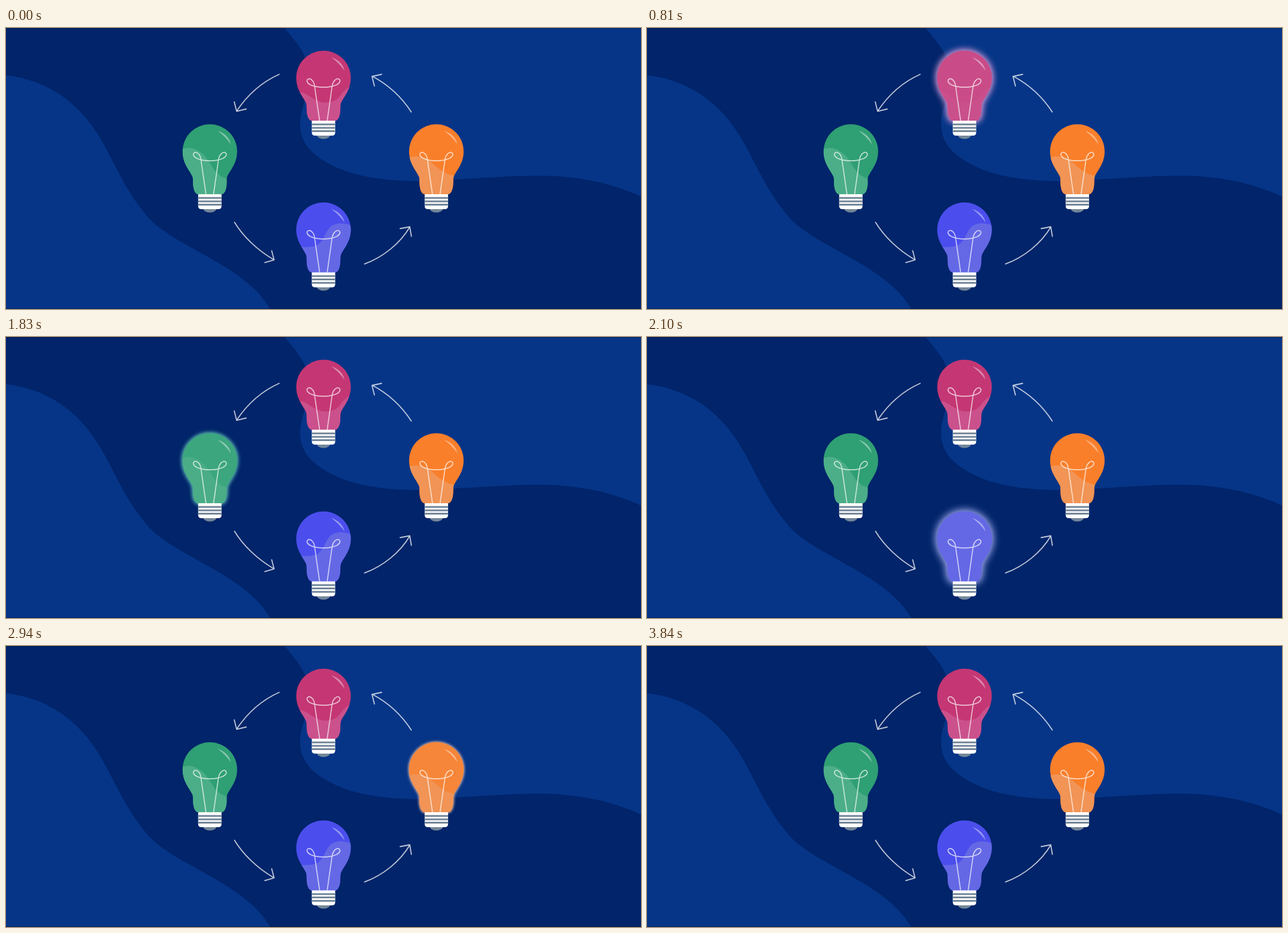
These frames come from a looping animation (1060 px wide and 470 px high, 3870 ms). An HTML page:

```html
<!DOCTYPE html>
<html lang="en">
<head>
<meta charset="utf-8">
<title>Light bulb cycle</title>
<style>
html, body { margin: 0; width: 100%; height: 100%; overflow: hidden; background: #01246a; }
svg { display: block; width: 100%; height: 100%; }
.arrow { fill: none; stroke: #fff; stroke-opacity: .74; stroke-width: 1.8; stroke-linecap: round; stroke-linejoin: round; }
.wire { fill: none; stroke: #fff; stroke-opacity: .68; stroke-width: 1.7; stroke-linejoin: round; }
.shine { fill: #fff; fill-opacity: .42; }
</style>
</head>
<body>
<svg viewBox="0 0 1060 470">
  <defs>
    <path id="glass" d="M0-45.5A45.5 45.5 0 0 1 45.5 0C45.5 20 34 31 29 42C27.7 46 28.4 50 28 55C27.5 63 25 72 18 72H-18C-25 72-27.5 63-28 55C-28.4 50-27.7 46-29 42C-34 31-45.5 20-45.5 0A45.5 45.5 0 0 1 0-45.5Z"/>
    <clipPath id="inside"><use href="#glass"/></clipPath>
    <g id="fittings">
      <path class="shine" d="M13-34.5C24-31 33-23 35-12C29-21 23-27 13-34.5Z"/>
      <path class="wire" d="M-6.5 71.5L-15 13C-16 5-22 0-25.5 1.8C-29 4-28 8-22 11.5C-10 17 10 17 22 11.5C28 8 29 4 25.5 1.8C22 0 16 5 14.5 13L6.2 71.5"/>
      <path fill="#738699" d="M-11 96C-9 104 9 104 11 96Z"/>
      <path fill="#fff" d="M-19.5 71.5H19.5V91Q19.5 96.5 14 96.5H-14Q-19.5 96.5-19.5 91Z"/>
      <path stroke="#738699" stroke-width="3" stroke-linecap="round" d="M-18.5 77.7H18.5M-18.5 83.4H18.5M-18.5 89.1H18.5"/>
    </g>
  </defs>
  <rect width="1060" height="470" fill="#01246a"/>
  <g fill="#063587">
    <path d="M0 79C60 86 110 115 146 167C180 216 190 262 240 320C290 370 400 398 441 470H0Z"/>
    <path d="M465 0C480 18 492 32 498 46C516 82 497 122 492 146C488 170 494 192 512 208C550 242 610 256 690 256C770 254 830 246 900 247C960 249 1010 259 1060 282V0Z"/>
  </g>
  <path d="M0 .5H1060M0 469.5H1060" stroke="#000" stroke-opacity=".3"/>
  <g class="arrow">
    <path d="M456 77.5C428 90 403 112 385 139M381 123.5L385 139.3L401 135.5"/>
    <path d="M676.5 140.5C660 115 640 96 612 81M627 77.5L611 81L615 97"/>
    <path d="M381.5 325C396 349 420 372 447 387.5M443.5 372.5L447.5 387.8L432 392.3"/>
    <path d="M598.5 394.7C630 383 658 360 674 333M658 335.5L674 332.5L676.7 348.5"/>
  </g>
  <g id="bulbs"></g>
</svg>
<script>
const LOOP = 3870, TICK = 30, STEPS = 6, TURN = 960, HOLD = 780;
const BLUR = 6.3, SPREAD = 5;

// In the order they light up
const bulbs = [
  { x: 530, y: 83.5, dark: '#c43774', light: '#cb518c', glow: '#f4a8e2',
    wave: 'M-46 25C-35 20-25 30-15 36C0 45 18 42 27 31C33 22 38 18 46 14V73H-46Z' },
  { x: 340.3, y: 206.5, dark: '#2f9f74', light: '#4bae88', glow: '#70d8c2',
    wave: 'M-46-4C-30-10-18-2-8 8C4 22 8 40 28 45L30 73H-46Z' },
  { x: 530, y: 337.2, dark: '#4b4eec', light: '#6468e5', glow: '#b4b9ff',
    wave: 'M-46 27C-38 30-22 30-13 27C0 22 2 4 12-5C22-13 36-11 46-7V73H-46Z' },
  { x: 718.4, y: 206.5, dark: '#f97f2b', light: '#f19455', glow: '#ffc9b2',
    wave: 'M-46 10C-30 6-18 9-8 18C4 30 14 37 30 41V73H-46Z' }
];

document.getElementById('bulbs').innerHTML = bulbs.map((b, i) => `
  <filter id="soft${i}" filterUnits="userSpaceOnUse" x="-85" y="-85" width="170" height="200" color-interpolation-filters="sRGB">
    <feGaussianBlur stdDeviation="0"/>
  </filter>
  <g transform="translate(${b.x} ${b.y})">
    <use class="glow" href="#glass" fill="${b.glow}" stroke="${b.glow}" filter="url(#soft${i})"/>
    <use href="#glass" fill="${b.dark}"/>
    <path d="${b.wave}" fill="${b.light}" clip-path="url(#inside)"/>
    <use class="lit" href="#glass" fill="${b.light}"/>
    <use href="#fittings"/>
  </g>`).join('');

const glows = document.querySelectorAll('.glow');
const lits = document.querySelectorAll('.lit');
const blurs = document.querySelectorAll('feGaussianBlur');

// Share of a stepped ramp done by time t
const ramp = (t, start) =>
  Math.min(1, Math.max(0, (Math.floor((t - start) / TICK + 1e-6) + 1) / STEPS));

function draw(t) {
  bulbs.forEach((b, i) => {
    const on = TICK + i * TURN;
    const p = ramp(t, on) - ramp(t, on + HOLD);
    lits[i].setAttribute('opacity', p);
    glows[i].setAttribute('visibility', p > 0 ? 'visible' : 'hidden');
    glows[i].setAttribute('stroke-width', SPREAD * p);
    blurs[i].setAttribute('stdDeviation', BLUR * p);
  });
}

function tick() {
  draw(performance.now() % LOOP);
  requestAnimationFrame(tick);
}
tick();
</script>
</body>
</html>
```
